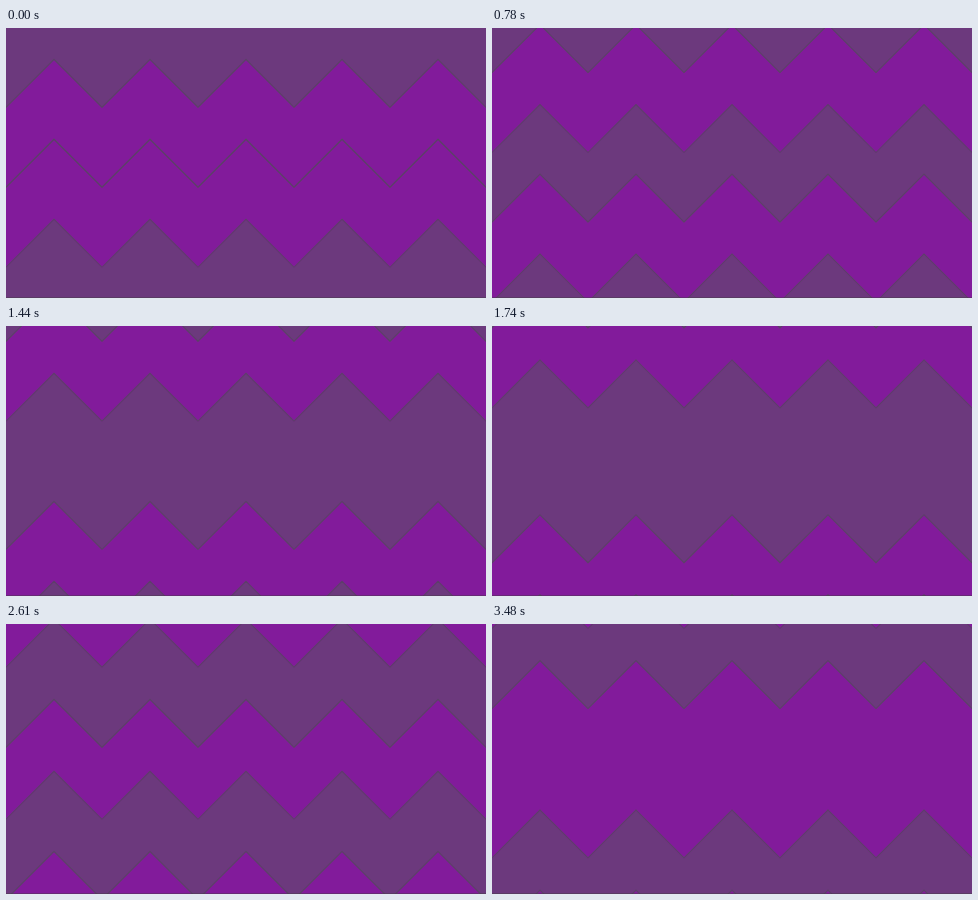
Write an HTML page with a canvas that moves like this. It is 480x270 px and loops after 3.51 s.

```html
<!DOCTYPE html>
<html>
<head>
<meta charset="utf-8">
<style>
  html, body { margin: 0; width: 100%; height: 100%; overflow: hidden; background: #6c397d; }
  canvas { display: block; }
</style>
</head>
<body>
<canvas id="stage" width="480" height="270"></canvas>
<script>
const ctx = document.getElementById('stage').getContext('2d');
const COLORS = ['#6c397d', '#821b9b'];
const LOOP = 3510, SPEED = 160 / 3600;
const BAND = 80, CENTER = 160, TOOTH = 48;

// Fills everything below a zigzag whose valleys sit at y.
function fillBelow(y, color) {
  const edge = new Path2D();
  for (let i = -1; i <= 11; i++) edge.lineTo(i * TOOTH, y - (i & 1 ? TOOTH : 0));
  const area = new Path2D(edge);
  area.lineTo(11 * TOOTH, 400);
  area.lineTo(-TOOTH, 400);
  ctx.fillStyle = color;
  ctx.fill(area);
  ctx.save();
  ctx.translate(0, -0.7);
  ctx.stroke(edge);
  ctx.restore();
}

function draw(time) {
  const shift = time % LOOP * SPEED;
  const step = Math.floor(shift / BAND), offset = shift % BAND;
  const color = n => COLORS[(step + n) % 2];

  ctx.fillStyle = color(2);
  ctx.fillRect(0, 0, 480, 270);
  ctx.strokeStyle = '#5c4068';
  ctx.lineWidth = 1.1;
  // Bands leave the center line upwards and downwards.
  for (let j = 1; j >= 0; j--) fillBelow(CENTER - offset - j * BAND, color(j));
  for (let j = 0; j < 2; j++) fillBelow(CENTER + offset + j * BAND, color(j + 1));

  ctx.fillStyle = 'rgba(64, 64, 64, 0.4)';
  ctx.fillRect(0, 269, 480, 1);
}

const start = performance.now();
function tick() {
  draw(performance.now() - start);
  requestAnimationFrame(tick);
}
tick();
</script>
</body>
</html>
```
